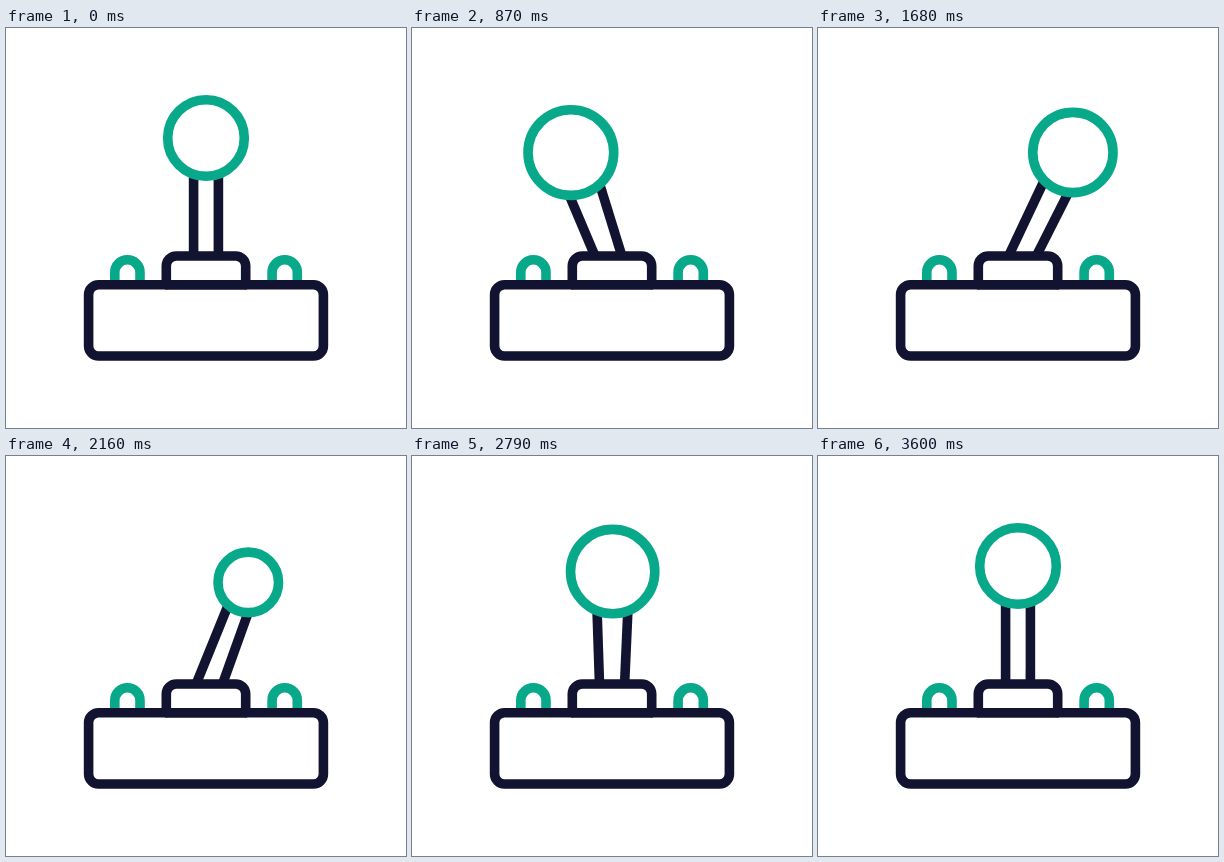
An HTML page with a canvas that plays this animation: 400 px wide and 400 px high, repeating every 3630 ms.

```html
<!DOCTYPE html>
<html lang="en">
<head>
<meta charset="utf-8">
<title>Joystick</title>
<style>
html, body { margin: 0; width: 100%; height: 100%; overflow: hidden; background: #fff; }
canvas { display: block; width: 400px; height: 400px; }
</style>
</head>
<body>
<canvas id="stage" width="400" height="400"></canvas>
<script>
const ctx = document.getElementById('stage').getContext('2d');
const NAVY = '#121331', GREEN = '#08a88a';
const LOOP = 3630, STEP = 30;
const PIVOT = { x: 200, y: 237 }, LENGTH = 127, REACH = 59;
const TILT_END = 600, SPIN_START = 548, FRONT = 1195, RELEASE = 2490;

// Sideways (x) and toward-viewer (z) offset of the knob.
function lean(t) {
  if (t >= RELEASE) {
    const s = t - RELEASE;
    return { x: 0, z: -REACH * Math.cos(Math.PI * s / 350) * Math.exp(-((s / 500) ** 2)) };
  }
  const u = Math.min(t / TILT_END, 1);
  const tilt = Math.asin(REACH / LENGTH) * (1 - Math.cos(Math.PI * u)) / 2;
  const turn = Math.PI / 2 * (Math.max(t, SPIN_START) - FRONT) / (FRONT - SPIN_START);
  const reach = LENGTH * Math.sin(tilt);
  return { x: reach * Math.sin(turn), z: reach * Math.cos(turn) };
}

function paint(color, fill) {
  if (fill) {
    ctx.fillStyle = '#fff';
    ctx.fill();
  }
  ctx.strokeStyle = color;
  ctx.stroke();
}

function drawStick(t) {
  const { x, z } = lean(t);
  const near = z > 0;
  const size = Math.abs(z);
  const radius = 38.3 + (near ? 0.017 : -0.0305) * size ** 1.5;
  const flare = (near ? 0.0021 : -0.001) * z * z;
  const rise = Math.sqrt(LENGTH ** 2 - x * x - z * z) - (near ? 0 : size * 0.045);
  const dx = x + (near ? z * 0.018 : 0);
  const len = Math.hypot(dx, rise);
  const ux = dx / len, uy = -rise / len;
  const base = 5, edge = len - radius;

  // The rods widen evenly up to the knob's edge.
  const point = (d, side) => {
    const half = 12.4 + flare * (d - base) / (edge - base);
    return [PIVOT.x + ux * d - uy * half * side, PIVOT.y + uy * d + ux * half * side];
  };
  ctx.lineCap = 'butt';
  for (const side of [-1, 1]) {
    ctx.beginPath();
    ctx.moveTo(...point(base, side));
    ctx.lineTo(...point(edge + 12, side));
    paint(NAVY);
  }
  ctx.beginPath();
  ctx.arc(PIVOT.x + dx, PIVOT.y - rise, radius, 0, 2 * Math.PI);
  paint(GREEN, true);
}

function drawButton(x) {
  ctx.beginPath();
  ctx.moveTo(x - 12.6, 256);
  ctx.arc(x, 244.4, 12.6, Math.PI, 0);
  ctx.lineTo(x + 12.6, 256);
  paint(GREEN);
}

function drawBase() {
  drawButton(121.4);
  drawButton(278.7);
  ctx.beginPath();
  ctx.roundRect(82.6, 256.7, 234.8, 71.3, 10);
  paint(NAVY, true);
  ctx.lineCap = 'round';
  ctx.beginPath();
  ctx.moveTo(160.3, 256.7);
  ctx.lineTo(160.3, 238);
  ctx.arcTo(160.3, 228, 170.3, 228, 10);
  ctx.lineTo(229.7, 228);
  ctx.arcTo(239.7, 228, 239.7, 238, 10);
  ctx.lineTo(239.7, 256.7);
  paint(NAVY, true);
  ctx.beginPath();
  ctx.moveTo(160.3, 256.7);
  ctx.lineTo(239.7, 256.7);
  paint(NAVY);
}

function frame() {
  const t = Math.floor(performance.now() % LOOP / STEP) * STEP;
  ctx.fillStyle = '#fff';
  ctx.fillRect(0, 0, 400, 400);
  ctx.lineWidth = 9.6;
  drawStick(t);
  drawBase();
  requestAnimationFrame(frame);
}
frame();
</script>
</body>
</html>
```
